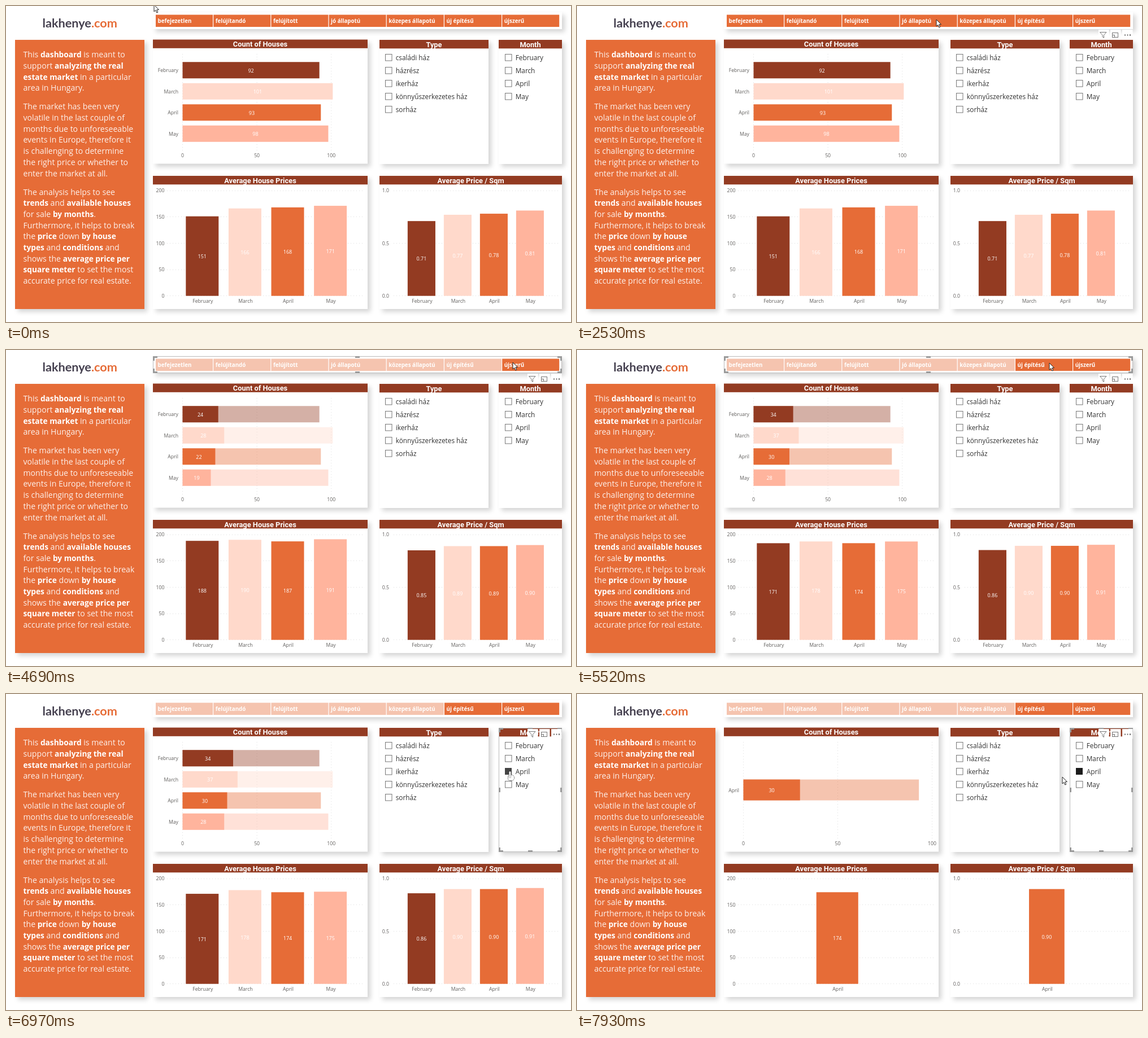
Animation of 1000x560 px, one loop 7990 ms. Source, as an HTML page with a canvas:

```html
<!DOCTYPE html>
<html lang="en">
<head>
<meta charset="utf-8">
<title>Housing dashboard</title>
<style>
html, body { margin: 0; width: 100%; height: 100%; overflow: hidden; background: #fff; }
canvas { display: block; }
</style>
</head>
<body>
<canvas id="stage" width="1000" height="560"></canvas>
<script>
const ctx = document.getElementById('stage').getContext('2d');
const LOOP = 7990;
const ORANGE = '#e66c37', BROWN = '#933b22', GREY = '#605e5c';
const COLORS = [BROWN, '#ffd9cb', ORANGE, '#ffb49d'];
const MONTHS = ['February', 'March', 'April', 'May'];
const TYPES = ['családi ház', 'házrész', 'ikerház', 'könnyűszerkezetes ház', 'sorház'];
const CONDITIONS = ['befejezetlen', 'felújítandó', 'felújított', 'jó állapotú',
  'közepes állapotú', 'új építésű', 'újszerű'];
const SANS = '"Open Sans", "Noto Sans", sans-serif';

// Asterisks switch bold on and off.
const STORY = `This *dashboard* is meant to
support *analyzing the real*
*estate market* in a particular
area in Hungary.

The market has been very
volatile in the last couple of
months due to unforeseeable
events in Europe, therefore it
is challenging to determine
the right price or whether to
enter the market at all.

The analysis helps to see
*trends* and *available houses*
for sale *by months*.
Furthermore, it helps to break
the *price* down *by house*
*types* and *conditions* and
shows the *average price per*
*square meter* to set the most
accurate price for real estate.`;

// Chart data by month: no filter, one condition, two conditions.
const COUNT = [[92, 101, 93, 98], [24, 28, 22, 19], [34, 37, 30, 28]];
const PRICE = { title: 'Average House Prices', x: 260, w: 380, plotX: 309.5, plotW: 302.4, tickX: 280.5,
  max: 200, ticks: 4, digits: 0, data: [[151, 166, 168, 171], [188, 190, 187, 191], [171, 178, 174, 175]] };
const SQM = { title: 'Average Price / Sqm', x: 661, w: 323, plotX: 703.4, plotW: 256, tickX: 678,
  max: 1, ticks: 2, digits: 2, data: [[.71, .77, .78, .81], [.85, .89, .89, .9], [.86, .9, .9, .91]] };

const FIRST_CLICK = 3740, SECOND_CLICK = 5310, MONTH_PRESS = 6700, MONTH_CLICK = 6900, MONTH_FILTER = 7040;

// Pointer moves: start, end, then the place it reaches.
const MOVES = [
  [390, 800, 410, 58], [800, 1160, 524, 43], [1160, 1290, 522, 29], [1690, 1970, 748, 29],
  [2110, 2530, 636, 24], [2930, 3140, 911, 22], [4620, 4690, 897, 22], [4690, 5170, 836, 23],
  [5560, 6060, 864, 142], [6130, 6270, 891, 137], [7450, 7660, 840, 152], [7860, 7930, 859, 147]
];

const mix = (a, b, k) => a + (b - a) * k;
const within = (t, a, b = LOOP) => t >= a && t < b;
function ease(t, a, b) {
  const k = Math.min(1, Math.max(0, (t - a) / (b - a)));
  return k * k * (3 - 2 * k);
}

function rect(x, y, w, h, color) {
  ctx.fillStyle = color;
  ctx.fillRect(x, y, w, h);
}

function text(str, x, y, size, color, align = 'left', weight = 400, family = SANS) {
  ctx.font = `${weight} ${size}px ${family}`;
  ctx.textAlign = align;
  ctx.fillStyle = color;
  ctx.fillText(str, x, y);
  return ctx.measureText(str).width;
}

function poly(points, x, y) {
  ctx.beginPath();
  points.forEach(([px, py]) => ctx.lineTo(x + px, y + py));
  ctx.closePath();
}

function panel(x, y, w, h, color, title) {
  ctx.save();
  ctx.shadowColor = 'rgba(0,0,0,.17)';
  ctx.shadowBlur = 8;
  ctx.shadowOffsetX = ctx.shadowOffsetY = 5;
  rect(x, y, w, h, color);
  ctx.restore();
  if (!title) return;
  rect(x, y, w, 15.3, BROWN);
  text(title, x + w / 2, y + 12.7, 12.85, '#fff', 'center', 700, 'Roboto, sans-serif');
}

function dotted(x1, y1, x2, y2) {
  ctx.strokeStyle = '#dcdcdc';
  ctx.lineWidth = 1;
  ctx.setLineDash([1, 4]);
  ctx.beginPath();
  ctx.moveTo(x1, y1);
  ctx.lineTo(x2, y2);
  ctx.stroke();
  ctx.setLineDash([]);
}

function story() {
  panel(16, 60, 229, 477, ORANGE);
  let y = 91.3;
  for (const line of STORY.split('\n')) {
    let x = 30.5;
    line.split('*').forEach((part, i) => {
      x += i % 2 ? text(part, x, y, 13.7, '#fff', 'left', 700)
                 : text(part, x, y, 14.1, 'rgba(255,255,255,.9)');
    });
    y += line ? 19.68 : 13.4;
  }
}

function conditions(t) {
  panel(260, 11, 724, 30, '#fff');
  CONDITIONS.forEach((name, i) => {
    const on = t < FIRST_CLICK || i === 6 || (i === 5 && t >= SECOND_CLICK);
    const x = 265 + 102.2 * i;
    rect(x, 15.5, 101, 21.5, on ? ORANGE : '#f5c4af');
    text(name, x + 3.5, 30, 9.75, '#fff', 'left', 700);
  });
}

function checklist(x, names, checked, fill) {
  names.forEach((name, i) => {
    const y = 85 + 23 * i;
    ctx.strokeStyle = '#777';
    ctx.lineWidth = 1;
    if (i === checked) rect(x, y, 12, 12, fill);
    else ctx.strokeRect(x + .5, y + .5, 11.5, 11.5);
    text(name, x + 18.7, y + 10.6, 11.8, '#333');
  });
}

// Filter step, and one month's value blended between steps.
const tweenStart = click => click + 105;
const stepAt = t => (t > tweenStart(FIRST_CLICK)) + (t > tweenStart(SECOND_CLICK));
function valueAt(data, month, t) {
  return [FIRST_CLICK, SECOND_CLICK].reduce((value, click, i) =>
    mix(value, data[i + 1][month], ease(t, tweenStart(click), click + 420)), data[0][month]);
}
const shownMonths = single => single ? [2] : [0, 1, 2, 3];

function countChart(t, single) {
  const x0 = single ? 294.5 : 312.5, unit = single ? 3.34 : 2.632, h = single ? 37 : 29;
  const months = shownMonths(single);
  panel(260, 59.5, 380, 220, '#fff', 'Count of Houses');
  for (const v of [0, 50, 100]) {
    dotted(x0 + v * unit, 85, x0 + v * unit, 256);
    text(v, x0 + v * unit, 268, 8.7, GREY, 'center');
  }
  months.forEach((m, row) => {
    const middle = 170 + 37.5 * (row - (months.length - 1) / 2);
    const w = valueAt(COUNT, m, t) * unit;
    ctx.globalAlpha = .4;
    if (stepAt(t)) rect(x0, middle - h / 2, COUNT[0][m] * unit, h, COLORS[m]);
    ctx.globalAlpha = 1;
    rect(x0, middle - h / 2, w, h, COLORS[m]);
    text(MONTHS[m], x0 - 7.5, middle + 3.5, 8.7, GREY, 'right');
    text(COUNT[stepAt(t)][m], x0 + w / 2, middle + 4, 9, '#fff', 'center', 500);
  });
}

function columnChart(t, single, c) {
  const top = 327, base = 513.7, months = shownMonths(single);
  const pitch = c.plotW / months.length, barW = single ? c.plotW * .245 : pitch * .767;
  panel(c.x, 301, c.w, 236, '#fff', c.title);
  for (let i = 0; i <= c.ticks; i++) {
    const y = mix(base, top, i / c.ticks), line = Math.floor(y) + .5;
    dotted(c.x + 25, line, c.x + c.w - 5, line);
    text((c.max * i / c.ticks).toFixed(c.digits && 1), c.tickX, y + 3.3, 8.7, GREY, 'right');
  }
  months.forEach((m, i) => {
    const middle = c.plotX + pitch * (i + .5);
    const h = valueAt(c.data, m, t) / c.max * (base - top);
    rect(middle - barW / 2, base - h, barW, h, COLORS[m]);
    text(c.data[stepAt(t)][m].toFixed(c.digits), middle, base - h / 2 + 4, 9, '#fff', 'center', 500);
    text(MONTHS[m], middle + 1, 526, 8.7, GREY, 'center');
  });
}

function toolbar(right, y) {
  const x = right - 61;
  for (let i = 0; i < 3; i++) {
    rect(x + 21 * i, y, 18.5, 17.5, '#fff');
    rect(x + 46 + 4.5 * i, y + 8.5, 2, 2, '#666');
  }
  // The last button's face covers its dots until they are drawn again.
  for (let i = 0; i < 3; i++) rect(x + 46 + 4.5 * i, y + 8.5, 2, 2, '#666');
  ctx.strokeStyle = '#777';
  ctx.lineWidth = 1;
  poly([[2.5, 4.5], [14, 4.5], [9.5, 9.5], [9.5, 14.5], [7, 12.5], [7, 9.5]], x, y);
  ctx.stroke();
  ctx.strokeRect(x + 24.5, y + 5.5, 10, 8);
  ctx.strokeRect(x + 24.5, y + 9.5, 4, 4);
}

function selection(x, y, w, h) {
  ctx.strokeStyle = '#bdbdbd';
  ctx.lineWidth = 1;
  ctx.strokeRect(x + .5, y + .5, w - 1, h - 1);
  // Handles sit at the start, middle and end of each side.
  for (const k of [0, .5, 1]) for (const end of [0, 1]) {
    rect(x + k * (w - 8), y + end * (h - 3), 8, 3, '#9a9a9a');
    if (k !== .5 || h > 60) rect(x + end * (w - 3), y + k * (h - 8), 3, 8, '#9a9a9a');
  }
}

const ARROW = [[0, 0], [0, 12], [2.8, 9.5], [4.8, 14], [6.8, 13.1], [4.8, 8.8], [8.5, 8.6]];

function hand(x, y) {
  ctx.beginPath();
  ctx.roundRect(x - 2.5, y + 7, 10.5, 9, 3);
  ctx.stroke();
  ctx.fill();
  ctx.beginPath();
  ctx.roundRect(x - .5, y, 3, 11, 1.5);
  ctx.stroke();
  ctx.fill();
}

function pointer(t) {
  const [x, y] = MOVES.reduce(([px, py], [start, end, toX, toY]) => {
    const k = ease(t, start, end);
    return [mix(px, toX, k), mix(py, toY, k)];
  }, [262, -2]);
  ctx.fillStyle = '#fff';
  ctx.strokeStyle = '#222';
  ctx.lineWidth = 1;
  if (within(t, 6270, 7520)) return hand(x, y);
  poly(ARROW, x, y);
  ctx.fill();
  ctx.stroke();
}

function draw(t) {
  const single = t >= MONTH_FILTER;
  rect(0, 0, 1000, 560, '#fff');
  const w = text('lakhenye', 64.5, 37.5, 21.7, '#45404f', 'left', 700, 'Lato, sans-serif');
  text('.com', 64.5 + w, 37.5, 21.7, ORANGE, 'left', 700, 'Lato, sans-serif');
  story();
  conditions(t);
  countChart(t, single);
  panel(661, 60, 193, 220, '#fff', 'Type');
  checklist(671, TYPES);
  panel(872, 60, 112, 220, '#fff', 'Month');
  checklist(883, MONTHS, t >= MONTH_CLICK ? 2 : -1, single ? '#1c1c1c' : '#444');
  columnChart(t, single, PRICE);
  columnChart(t, single, SQM);

  if (within(t, FIRST_CLICK, MONTH_CLICK)) selection(260, 11, 724, 30);
  if (within(t, MONTH_PRESS)) selection(872, 60, 112, 220);
  if (within(t, 460, 740) || within(t, 1230, MONTH_CLICK)) toolbar(984, 42);
  if (within(t, 6270)) toolbar(984, 62);
  if (within(t, 7590, 7860)) toolbar(854, 62);
  pointer(t);
}

function frame() {
  draw(performance.now() % LOOP);
  requestAnimationFrame(frame);
}
frame();
</script>
</body>
</html>
```
